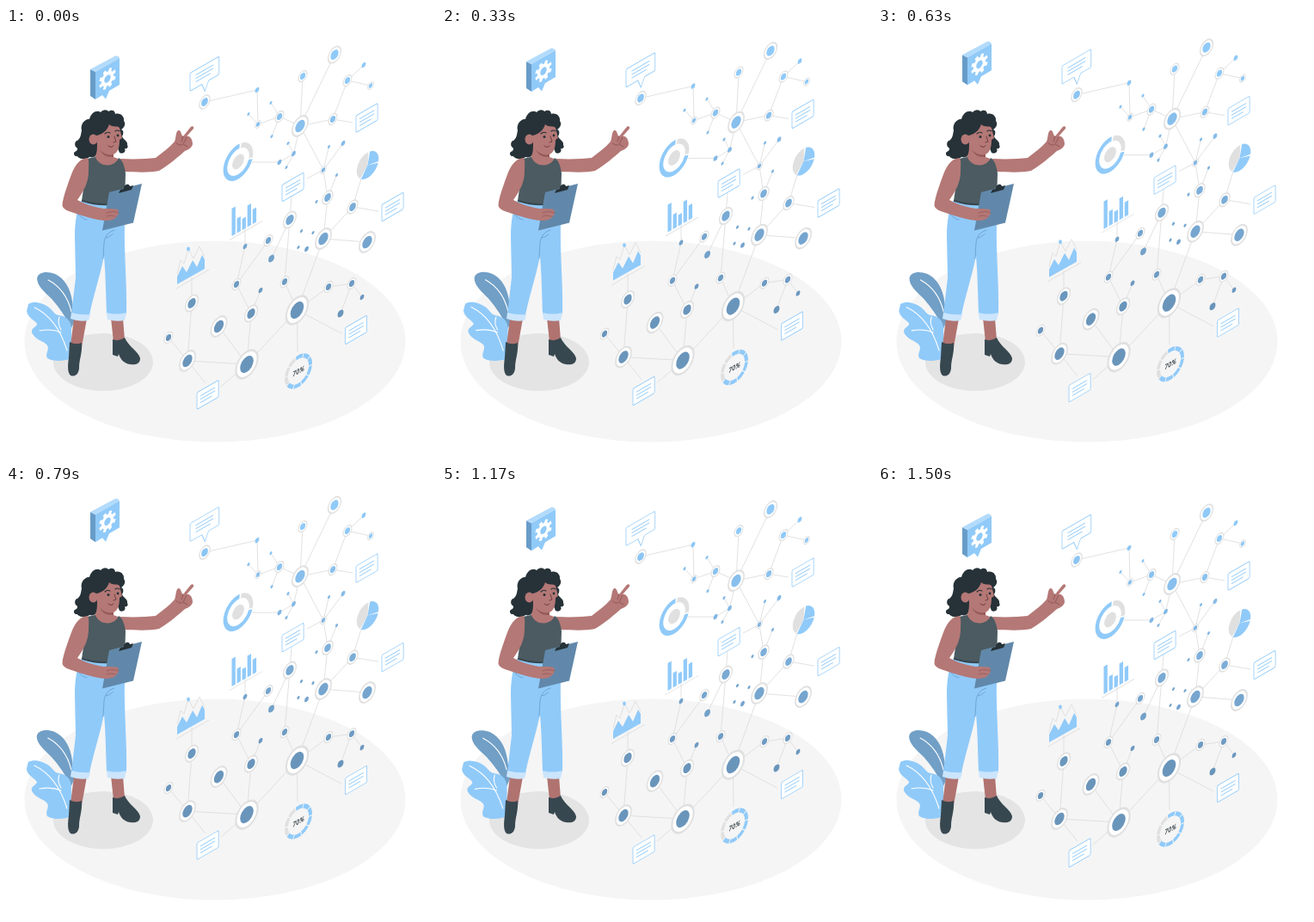
These frames come from a looping animation (500 by 500 pixels, 1540 ms). An HTML page:

```html
<!DOCTYPE html>
<html lang="en">
<head>
<meta charset="utf-8">
<title>Network presentation</title>
<style>
html, body { margin: 0; height: 100%; overflow: hidden; background: #fff; }
svg { display: block; width: 100vw; height: 100vh; }
.sky { fill: #90caf9; }
.skin { fill: #b47876; }
.dark { fill: #263238; }
.boot { fill: #37474f; }
.line { fill: none; stroke-linecap: round; }
.wire { fill: none; stroke: #dedede; stroke-width: .9; }
.card { fill: #fff; stroke: #90caf9; stroke-width: .9; stroke-linejoin: round; }
text { font: italic bold 8px Lato, sans-serif; text-anchor: middle; fill: #263238; }
</style>
</head>
<body>
<svg viewBox="0 0 500 500">
  <ellipse cx="243" cy="364.5" rx="221.5" ry="117" fill="#f5f5f5"/>
  <ellipse cx="113" cy="388.5" rx="58" ry="33.5" fill="#e4e4e4"/>

  <g id="plant">
    <path fill="#719fc6" d="M76 349C70 337 62 325 53 315C45 307 36 300 36 291C37 284 47 282 57 286C68 291 75 303 77 318L80 340Z"/>
    <path class="sky" d="M26 321C33 317 43 320 50 325C55 329 56 333 61 334C69 335 75 339 76 348V384C67 388 54 388 48 384C45 378 51 374 48 369C44 364 35 363 31 356C27 349 36 348 36 344C33 339 25 337 24 329Z"/>
    <path class="line" stroke="#fff" stroke-width="1.1" d="M49 293C62 300 72 313 76 330M33 325C48 332 62 346 71 375M39 352C50 350 57 351 64 354M62 336C60 342 61 346 64 351"/>
  </g>

  <g id="person">
    <path fill="#b07370" d="M79 338L75 369L88 371L94 338ZM122 337L125 365L138 363L136 337Z"/>
    <path class="boot" d="M74 365Q81 369 88 366C89 378 85 385 85 396C84 403 80 406 75 404C71 400 72 391 73 383ZM124 362Q131 365 138 360C142 370 154 376 156 384C156 391 150 392 144 391C137 390 133 385 131 379L130 382L124 380Z"/>
    <path class="sky" d="M87 201C82 213 80 226 80 243L81 290L76 333L97 334C101 313 109 290 114 265C116 288 116 310 117 333H140C141 297 137 265 138 225L134 202Z"/>
    <path fill="#cbe5fc" d="M76 331Q87 334 98 333L96 340Q85 342 75 338ZM117 331Q128 334 140 331L138 340Q128 342 118 339Z"/>
    <path class="line" stroke="#6ea6d6" d="M126 235C119 237 115 242 114 250L113 268M84 216Q88 222 94 223M124 240Q119 244 116 244"/>
    <path class="skin" d="M133 152C150 153 164 152 174 151C183 144 190 139 196 132C198 127 197 122 200 119C204 118 203 124 206 126L214 116C216 113 219 114 218 117L210 126C214 125 217 130 217 135C216 139 213 141 208 143C201 149 190 159 178 166C169 168 157 168 136 167Z"/>
    <path class="line" stroke="#8f5654" stroke-width=".9" d="M206 126L204 132M210 127L206 135L211 138M198 134Q201 137 205 136"/>
    <path class="dark" d="M97 106C99 98 106 95 110 98C113 94 118 95 119 97C124 94 127 97 127 100C133 98 138 103 137 108C140 112 137 116 134 118C138 120 136 124 135 126C136 130 142 131 141 136C143 139 140 141 138 140C140 144 136 147 132 145L126 130L106 138C108 146 104 152 97 150C93 154 84 152 83 149C79 150 78 145 80 144C83 143 84 140 82 139C79 137 80 131 83 131C87 128 87 124 88 119C86 112 92 105 97 106Z"/>
    <path class="skin" d="M106 136L105 125C112 124 118 119 120 112C124 116 130 113 132 116L135 128L132 130C132 139 130 145 125 147V150L133 153C130 164 106 164 102 151Q106 149 106 136Z"/>
    <ellipse class="skin" cx="101.500" cy="129.500" rx="5" ry="6"/>
    <path fill="#955a58" d="M109 141Q115 149 125 147V150Q113 151 109 141Z"/>
    <path class="line" stroke="#263238" stroke-width="1.1" d="M115 123Q118 120 121 122M127 120Q129 118 132 120"/>
    <circle class="dark" cx="119" cy="126.500" r="1.500"/><circle class="dark" cx="130" cy="125" r="1.400"/>
    <path class="line" stroke="#6d3f3d" d="M126 126L128 132L125 133M119 137Q122 140 125 137"/>
    <path fill="#4b5b61" d="M94 152L104 150C108 162 126 163 131 151C135 153 138 160 139 169L138 203C122 207 104 206 88 201C90 188 92 178 88 168Z"/>
    <path class="line" stroke="#37474f" stroke-width="2" d="M89 201Q104 206 120 205"/>
    <path fill="#6188aa" d="M120 191L158 181L148 226.500L112 235.500Z"/>
    <path class="dark" d="M131 192L133 188L137 187C137 182 143 180 144 184L148 183L146 188Z"/>
    <path class="skin" d="M95 151C84 152 79 162 75 173C70 187 66 198 65.500 206C66 210 70 212 76 214C90 219 104 223 115 224C123 224 129 222 131 215L130 211C123 209 115 211 108 209C98 207 90 204 83 200C90 190 96 180 96 167C96 161 97 155 95 151Z"/>
    <path class="line" stroke="#945a58" stroke-width=".8" d="M131 215Q124 212 117 215M127 219Q121 217 117 219"/>
  </g>

  <g id="network"></g>

  <g id="bubble">
    <path fill="#689cc8" d="M104 51L98 48V79L104 83Z"/>
    <path fill="#b3dbfb" d="M98 48L127 32.500Q130 31.500 132 35L104 51Z"/>
    <path class="sky" d="M104 51L132 35V66L120 73L116 82.500L112 78L104 83Z"/>
  </g>
</svg>
<script>
const SKY = '#90caf9', GRAY = '#e0e0e0';
const $ = id => document.getElementById(id);
const add = (id, markup) => $(id).insertAdjacentHTML('beforeend', markup);
const repeat = (n, make) => Array.from({ length: n }, (_, i) => make(i)).join('');

// Everything floating lies on one isometric wall
const iso = (x, y, inner) => `<g transform="matrix(.866 -.5 0 1 ${x} ${y})">${inner}</g>`;
const polar = (r, deg) => [r * Math.cos(deg * Math.PI / 180), r * Math.sin(deg * Math.PI / 180)];
const sweep = (r, from, to) => `${polar(r, from)}A${r} ${r} 0 ${+(to - from > 180)} 1 ${polar(r, to)}`;
const arc = (r, from, to, width, color) =>
  `<path fill="none" stroke="${color}" stroke-width="${width}" d="M${sweep(r, from, to)}"/>`;
const wedge = (r, from, to, color) => `<path fill="${color}" d="M0 0L${sweep(r, from, to)}Z"/>`;
const rules = (x, y, width) =>
  `<path class="line" stroke="${SKY}" d="${repeat(3, i => `M${x} ${y + 4 * i}h${i < 2 ? width : width - 4}`)}"/>`;

// The network is a tree: a wire joins each node to its children
const TINY = 1.8, DOT = 2.8, BEAD = 4, XS = 4.5, S = 6.4, M = 7.8, L = 9.4, XL = 11.5, HUB = 15.8;
const node = (r, x, y, ...kids) => ({ r, x, y, kids });
const end = (x, y) => node(0, x, y);

const upper = node(XL, 342, 114,
  node(S, 345, 56), node(L, 382, 31),
  node(S, 380, 106, end(403, 110),
    node(S, 397, 61, node(DOT, 416, 43), node(XS, 424, 67))),
  node(S, 318, 103, node(TINY, 308, 87), node(TINY, 309, 126),
    node(XS, 293, 112, node(TINY, 282, 100),
      node(DOT, 292, 72, node(M, 231, 86)))),
  node(DOT, 334.5, 146, node(TINY, 328, 134), node(TINY, 326, 162),
    node(DOT, 318, 156, end(286, 156))));

const lower = node(HUB, 280, 391, end(250, 417),
  node(XL, 247.5, 347),
  node(XL, 211, 387, end(232, 413), node(S, 189, 360),
    node(L, 216, 320, end(216, 290))),
  node(L, 285, 332, node(DOT, 296, 305),
    node(S, 268, 298, node(S, 305, 247),
      node(DOT, 278, 254, end(278, 233)))));

const root = node(HUB, 338.5, 328, lower, end(390, 355), end(339, 377),
  node(S, 375, 301,
    node(S, 402, 297, node(DOT, 414, 313), node(BEAD, 389, 332))),
  node(S, 324, 295,
    node(L, 330, 223, end(332, 196), node(BEAD, 308.5, 268))),
  node(XL, 369, 245, node(XL, 420, 249),
    node(M, 403, 208, end(413, 175), end(433, 213)),
    node(M, 374, 197, node(TINY, 384.5, 171),
      node(XS, 369, 165, upper, end(350, 175), node(TINY, 375.5, 138), node(DOT, 392, 134)))));

const loose = [node(TINY, 361, 202), node(TINY, 343.5, 236), node(TINY, 357, 238),
  node(TINY, 340, 255), node(DOT, 349.5, 257)];

// Nodes darken towards the floor
function shade(y) {
  const k = Math.min(1, Math.max(0, (y - 60) / 270));
  return `rgb(${144 - 38 * k},${202 - 53 * k},${249 - 62 * k})`;
}
function disc({ r, x, y }) {
  const width = .4 + r * .13, ringed = r >= XS;
  const ring = ringed ? `<circle r="${r - width / 2}" fill="#fff" stroke="${GRAY}" stroke-width="${width}"/>` : '';
  return iso(x, y, ring + `<circle r="${ringed ? r * .57 : r}" fill="${shade(y)}"/>`);
}
const wires = n => n.kids.map(kid => `M${n.x} ${n.y}L${kid.x} ${kid.y}` + wires(kid)).join('');
const discs = n => disc(n) + n.kids.map(discs).join('');
add('network', `<path class="wire" d="${wires(root)}"/>` + discs(root) + loose.map(disc).join(''));

// Text cards and the speech bubble
const card = (x, y) => add('network', iso(x, y,
  '<rect class="card" width="29" height="19.5" rx="1.5"/>' + rules(5, 6, 19)));
card(407, 102);
card(437, 205.5);
card(321, 182.5);
card(222, 424);
card(394.5, 348.5);
add('network', iso(214, 52.5,
  '<path class="card" d="M1 0H38L39 1V20L38 21H25L20 31L16 21H1L0 20V1Z"/>' + rules(8, 6, 23)));

// Charts
add('network', iso(270, 155.5,
  arc(17.4, 18, 276, 5.3, SKY) + arc(17.4, -77, 13, 5.3, GRAY) + `<circle r="8" fill="${GRAY}"/>`));
add('network', iso(420.5, 159.5,
  wedge(14.8, 133, 274, GRAY) + wedge(14.8, -78, 11, SKY) + wedge(14.8, 17, 127, SKY)));
add('network', iso(262.5, 242,
  [32, 17, 13, 25, 17].map((h, i) => `<rect class="sky" x="${i * 7}" y="${-h}" width="5" height="${h}"/>`).join('')
  + '<path class="wire" d="M-3 3H41"/>'));
add('network', `<path class="wire" d="M197 303.5L236 281M199 286L203 270L207 274L212 257L218 268L225 254L231 266"/>
  <path class="sky" d="M199 298V289L205 277L210 284L217 270L222 278L228 264L231 269V280Z"/>
  <ellipse class="sky" cx="212" cy="257" rx="1.9" ry="2.4"/>`);
add('network', iso(340, 399,
  repeat(10, i => arc(16.3, 259 + i * 36, 291 + i * 36, 4.5, i < 7 ? SKY : GRAY)) + '<text y="3">70%</text>'));

// Gear
add('bubble', iso(118, 59, '<circle r="6.3" fill="none" stroke="#fff" stroke-width="4"/>' + repeat(8, i =>
  `<rect x="-2" y="-11.3" width="4" height="4.5" rx=".6" fill="#fff" transform="rotate(${22.5 + i * 45})"/>`)));

// 24 steps per second; a 1.5 s cycle plus one repeated step
const LOOP = 1540, STEP = 1000 / 24, STEPS = 36;
function draw(now) {
  const p = (Math.floor((now % LOOP + 4) / STEP) + .5) / STEPS % 1;
  const rise = 1 - Math.abs(1 - 2 * p);
  const sway = p < .25 ? 4 * p : p < .75 ? 2 - 4 * p : 4 * p - 4;
  $('network').setAttribute('transform', `translate(0 ${.28 - 10 * rise})`);
  $('bubble').setAttribute('transform', `translate(0 ${.56 - 20 * rise})`);
  $('plant').setAttribute('transform', `rotate(${sway} 62 387)`);
}
const start = performance.now();
function tick() {
  draw(performance.now() - start);
  requestAnimationFrame(tick);
}
tick();
</script>
</body>
</html>
```
